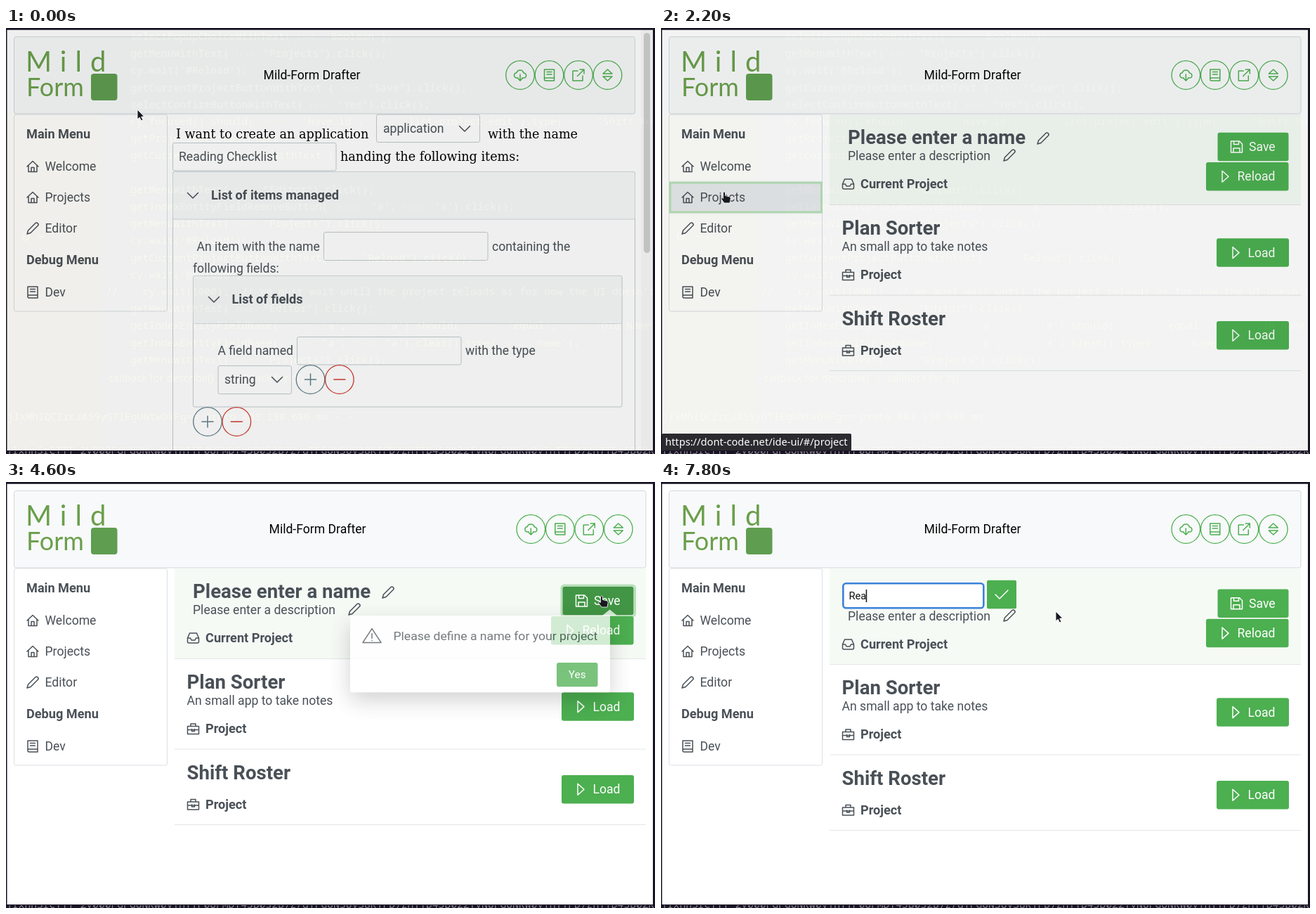
Animation of 924 by 606 pixels, one loop 8 s. Source, as an HTML page:

```html
<!DOCTYPE html>
<html lang="en">
<head>
<meta charset="utf-8">
<title>Mild-Form Drafter</title>
<style>
html, body { margin: 0; width: 100%; height: 100%; overflow: hidden; background: #fff; }
svg { display: block; width: 100vw; height: 100vh; }
text { font: 17.6px Roboto, sans-serif; fill: #495057; white-space: pre; }
.bold { font-weight: 700; font-size: 18.15px; }
.big { font-weight: 700; font-size: 27.6px; }
.serif { font-family: "DejaVu Serif", serif; fill: #000; }
.title { fill: #000; text-anchor: middle; }
.white { fill: #fff; }
.small { font-size: 15.4px; text-anchor: middle; }
.entry { font-size: 14.67px; fill: #111; }
.mono { font: 14.67px "Noto Sans Mono", monospace; }
.url { font: 14.67px "Noto Sans", sans-serif; fill: #fff; }
.logo { font-family: Lato, sans-serif; fill: #6a9f4b; }
.ghost text { fill: #fbf9f1; fill-opacity: .75; }
.hint { font-size: 11px; fill-opacity: .4; }
.icon { fill: none; stroke: #495057; stroke-width: 1.5; stroke-linejoin: round; stroke-linecap: round; }
.icon.pale { stroke: #fff; }
.field { fill: none; stroke: #c4cad0; }
.panel { fill: #f8f9fa; stroke: #d3d8dd; }
.rule { stroke: #e3e6e9; }
.button { fill: #4caf50; }
#page { mix-blend-mode: multiply; }
#popup { transform-origin: 490px 190px; }
#popupBox { filter: drop-shadow(0 12px 16px rgba(0, 0, 0, .24)); }
</style>
</head>
<body>
<svg id="stage" viewBox="0 0 924 606" preserveAspectRatio="none"></svg>
<script>
const ICONS = {
  home: 'M-8 0L0 -7.5L8 0M-6 -1.8V7.5H6V-1.8M-2 7.5V1.5H2V7.5',
  pencil: 'M-8 8L-6.5 3L4 -7.5Q5.5 -8.8 7.2 -7.2Q8.8 -5.5 7.5 -4L-3 6.5Z',
  book: 'M-7 -8H7V8H-5Q-7 8 -7 6ZM-7 5Q-7 4 -5 4H7M-3.5 -4.5H3.5M-3.5 -1H3.5',
  inbox: 'M-8 0L-5 -7H5L8 0V5Q8 7 6 7H-6Q-8 7 -8 5ZH-4L-2.5 3H2.5L4 0H8',
  briefcase: 'M-8 -4H8V7H-8ZM-3.5 -4V-7.5H3.5V-4M-8 1H8M-2 0V3H2V0',
  save: 'M-8 -8H4L8 -4V8H-8ZM-4 -8V-3.5H3V-8M-4.5 8V2H4.5V8',
  play: 'M-4 -8L5 0L-4 8Z',
  cloud: 'M-3 4H-5Q-8.5 3.5 -8.5 0Q-8 -3 -5 -3.4Q-4 -7 0 -7Q4 -7 5 -3Q8.6 -2.5 8.6 .7Q8.5 4 5 4H3M0 -1V8M-3 5L0 8L3 5',
  link: 'M-1 -6H-8V8H6V1M2 -8H8V-2M8 -8L-1.5 1.5',
  sort: 'M-6.5 -2L0 -8L6.5 -2ZM-6.5 2L0 8L6.5 2Z',
  chevron: 'M-7.5 -3.5L0 4L7.5 -3.5',
  check: 'M-9 0L-3 6L9 -6',
  plus: 'M-8 0H8M0 -8V8',
  minus: 'M-8 0H8',
  warning: 'M0 -10.5L13 10.5H-13ZM0 -3V4M0 7V7.4'
};

const text = (x, y, s, cls = '', style = '') =>
  `<text x="${x}" y="${y}" class="${cls}" style="${style}">${s}</text>`;
const icon = (name, x, y, cls = '', extra = '') =>
  `<path class="icon ${cls}" d="${ICONS[name]}" transform="translate(${x} ${y})" ${extra}/>`;
const rect = (x, y, w, h, attrs) => `<rect x="${x}" y="${y}" width="${w}" height="${h}" ${attrs}/>`;
const box = (x, y, w, h, cls) => rect(x, y, w, h, `class="${cls}" rx="2.5"`);
const line = (x1, y1, x2, y2) => `<path class="rule" d="M${x1} ${y1}L${x2} ${y2}"/>`;
const group = (id, body, attrs = '') => `<g id="${id}" ${attrs}>${body}</g>`;
const ring = (x, y, name, color) =>
  `<circle cx="${x}" cy="${y}" r="20.3" fill="none" stroke="${color}" stroke-width="1.3"/>` +
  icon(name, x, y, '', `style="stroke:${color}"`);
const button = (x, y, w, name, label, id = '') =>
  rect(x, y, w, 40.5, `class="button" rx="3" id="${id}"`) +
  icon(name, x + 27, y + 20.3, 'pale') + text(x + 44.5, y + 26.2, label, 'white');

const header = () =>
  rect(11.5, 12.5, 884, 109.5, 'id="headerBox" class="panel" rx="3"') +
  text(28, 62, 'Mild', 'logo', 'font-size:40px;letter-spacing:12px') +
  text(29, 97, 'Form', 'logo', 'font-size:36px') +
  rect(121, 65, 37.5, 38, 'fill="#5f9d50" rx="4"') +
  group('headerTitle', text(435.5, 73, 'Mild-Form Drafter', 'title')) +
  group('headerIcons', ['cloud', 'book', 'link', 'sort']
    .map((name, i) => ring(732 + i * 41.5, 67, name, '#4caf50')).join(''));

const menu = () =>
  rect(11.5, 123, 218, 280, 'rx="3" fill="#fff" stroke="#dbdfe4"') +
  rect(12, 0, 217.5, 44, 'id="menuHover" fill="#e6e9ed"') +
  rect(13, 220, 215.5, 42, 'id="menuFocus" fill="none" stroke="#b7dfb9" stroke-width="3"') +
  text(29, 157, 'Main Menu', 'bold') + text(29, 336, 'Debug Menu', 'bold') +
  [['home', 'Welcome', 197], ['home', 'Projects', 241], ['pencil', 'Editor', 285], ['book', 'Dev', 376]]
    .map(([name, label, y]) => icon(name, 38, y) + text(55.5, y + 6, label)).join('');

const editor = () =>
  text(242, 157, 'I want to create an application', 'serif') +
  box(527.5, 123, 147, 39.5, 'field') + text(537, 148.5, 'application') + icon('chevron', 653, 143) +
  text(686, 157, 'with the name', 'serif') +
  box(237.5, 163.5, 232.5, 39.5, 'field') + text(246, 189, 'Reading Checklist') +
  text(476, 189, 'handing the following items:', 'serif') +
  box(237.5, 204.5, 658, 420, 'field') + box(237.5, 204.5, 658, 67.5, 'panel') +
  icon('chevron', 266, 238) + text(292, 244, 'List of items managed', 'bold') +
  text(271.5, 317, 'An item with the name') + box(452.5, 290.5, 233.5, 40, 'field') +
  text(692, 317, 'containing the') + text(266, 347.5, 'following fields:') +
  box(266.5, 352.5, 610.5, 186.5, 'field') + box(266.5, 352.5, 610.5, 68, 'panel') +
  icon('chevron', 296, 386) + text(321.5, 392, 'List of fields', 'bold') +
  text(301.5, 465, 'A field named') + box(414.5, 439.5, 233.5, 39.5, 'field') + text(654, 465, 'with the type') +
  box(302, 480.5, 104.5, 40, 'field') + text(311, 506, 'string') + icon('chevron', 386, 500) +
  [[433.5, 500], [287, 560]].map(([x, y]) =>
    ring(x, y, 'plus', '#607d8b') + ring(x + 41.3, y, 'minus', '#d3382f')).join('') +
  rect(904, 3, 17, 598, 'fill="#f9f9f9"') + rect(908, 7, 9, 313, 'rx="4.5" fill="#cfd0d1"');

const project = (y, name, note) => {
  const low = note ? 0 : -21.5;
  return text(257.5, y, name, 'big') + (note ? text(257.5, y + 23, note) : '') +
    icon('briefcase', 266.5, y + 57.5 + low) + text(284, y + 63 + low, 'Project', 'bold');
};

const projects = () =>
  rect(240, 123, 671, 128, 'id="card" fill="#f5faf5"') +
  group('nameView', text(266, 165, 'Please enter a name', 'big') + icon('pencil', 544, 157)) +
  group('nameEdit',
    rect(259.3, 144.3, 200, 35, 'rx="4" fill="#fff" stroke="#3a82da" stroke-width="2.6"') +
    '<text id="entry" class="entry" x="267.5" y="167"></text>' +
    rect(268, 153, 1.5, 18, 'id="caret" fill="#111"') +
    rect(464, 139.7, 42, 40.5, 'class="button" rx="2"') + icon('check', 485, 160, 'pale')) +
  group('about', text(266, 188, 'Please enter a description') + icon('pencil', 496, 181) +
    icon('inbox', 266.5, 222) + text(284, 228, 'Current Project', 'bold')) +
  group('actions',
    rect(791, 147, 104.5, 44, 'id="saveFocus" rx="4" fill="none" stroke="#b7dfb9" stroke-width="3"') +
    button(792.5, 148.7, 101, 'save', 'Save', 'save') + button(776, 191, 117.5, 'play', 'Reload')) +
  group('others', line(240, 251.5, 911, 251.5) + line(240, 380, 911, 380) + line(240, 487.5, 911, 487.5) +
    project(294, 'Plan Sorter', 'An small app to take notes') + project(423, 'Shift Roster') +
    button(791, 299.3, 103, 'play', 'Load') + button(791, 417, 103, 'play', 'Load'));

const popup = () =>
  '<path id="popupBox" fill="#fff" d="M493 190H849L859.5 181L870 190H860V302Q860 305 857 305H493Q490 305 490 302V193Q490 190 493 190Z"/>' +
  icon('warning', 521, 220, '', 'stroke-width="2"') +
  text(551.5, 227, 'Please define a name for your project') +
  rect(782.5, 259, 61, 39, 'id="yesFocus" rx="4" fill="none" stroke="#b7dfb9" stroke-width="3"') +
  rect(784, 260.5, 58.5, 36, 'id="yes" class="button" rx="3"') + text(813.2, 283.8, 'Yes', 'white small');

const CODE = [
  "selectPopupChoiceWithText( text: 'Boolean');", 'getMenuWithText( text: "Projects").click();',
  "cy.wait('@Reload');", 'getCurrentProjectButtonWithText ( text: "Save").click();',
  'selectConfirmButtonWithText( text: "Yes").click();',
  "cy.focused().should( chainer: 'have.id', value: 'list-project-edit').type( text: \"Shift Roster\");",
  'getProjectButtonWithText', 'getCurrentProjectButtonWithText (', '',
  'getMenuWithText( text: "Editor").click();', "getIndexEntityFieldRemoveButton( entity: 'a', field: 'a').click();",
  'getMenuWithText( text: "Projects").click();', "cy.wait('@Reload');",
  'getCurrentProjectButtonWithText( text: "Reload").click();', "cy.wait('@Reload');",
  "  cy.wait(1000);  // We must wait until the project reloads as for now the UI doesn't",
  'getMenuWithText( text: "Editor").click();', "getIndexEntityFieldName( entity: 'a', field: 'a').should( chainer: 'equal', value: 'Old Name');",
  "getIndexEntityFieldName( entity: 'a', field: 'a').clear().type( text: 'name');", 'getMenuWithText( text: "Projects").click();'
];
const withHints = s => s.replace(/\w+: (?=['"])/g, '<tspan class="hint">$&</tspan>');
const TOKEN = 'jIxhnSrCTTT_2V000FGFGUNKw0VTHTTF0UFMDT45B0S2B7Z/dTFGUNSUV38KTFD7ZHTTD45B022TVNUFGUNKW0VTHTTFD7ZHTTD45B02KTZV0';

// The terminal and code window shining through the page
const ghost = () =>
  rect(0, 0, 924, 606, 'fill="#eeefee"') + rect(1, 122, 133, 480, 'fill="#f0efeb"') +
  CODE.map((s, i) => text(177, 17 + i * 24.2, withHints(s), 'mono')).join('') +
  text(142, 380, '//', 'mono') + text(20, 303, '⚙  –') +
  text(146, 503, 'callback for describe()   ›   callback for it()', 'url') +
  text(2, 558, 'jIxMhIQCZrcJA59yGTlEgUNtwD8Fg== proto 403 130.686 ms - -', 'mono') +
  text(0, 606, TOKEN, 'mono');

const frame = () =>
  '<path fill="#191424" d="M0 0H924V606H0ZM1.5 2.8V601H921V2.8Z" fill-rule="evenodd"/>' +
  '<clipPath id="strip"><path d="M0 602H924V606H0Z"/></clipPath>' +
  `<g clip-path="url(#strip)">${text(0, 606, TOKEN, 'mono', 'fill:#85818c')}</g>`;

const pointer = () =>
  '<path id="arrow" fill="#17191f" stroke="#fff" stroke-width=".9" d="M0 0V14L3.2 11.2L5.6 16L8 14.8L5.7 10.3L9.6 9.8Z"/>' +
  '<path id="hand" fill="#17191f" stroke="#fff" stroke-width=".8" d="M-1.5 1Q0 -1 1.5 1V5.5L7.5 7Q9.5 7.6 9.2 9.5L8 16H0L-4 10.5Q-4.8 8.4 -2.8 8.6L-1.5 9.5Z"/>';

const statusBar = () =>
  rect(1, 577, 262, 24.5, 'id="statusBox" rx="2" fill="#2b2b2f"') +
  '<text id="statusText" class="url" x="6" y="594"></text>';

document.getElementById('stage').innerHTML =
  rect(0, 0, 924, 606, 'fill="#fff"') + group('ghost', ghost(), 'class="ghost"') +
  group('page', header() + menu() + group('editor', editor()) + group('projects', projects())) +
  group('popup', popup()) + group('status', statusBar()) + frame() + group('pointer', pointer());

// time, x, y of the pointer tip
const PATH = [
  [600, 187, 116], [900, 160, 165], [1200, 124, 250], [1500, 106, 276], [1600, 106, 263],
  [1700, 100, 250], [1900, 90, 233], [3500, 90, 233], [3600, 690, 184], [3900, 770, 173],
  [4100, 838, 166], [4300, 848, 162], [4800, 848, 162], [5100, 842, 205], [5500, 813, 278],
  [5900, 813, 278], [6000, 732, 233], [6200, 732, 233], [6300, 562, 184], [8000, 562, 184]
];

function pointerAt(t) {
  const i = PATH.findIndex(p => p[0] > t);
  if (i < 1) return PATH[i < 0 ? PATH.length - 1 : 0].slice(1);
  const [a, b] = [PATH[i - 1], PATH[i]];
  const k = (t - a[0]) / (b[0] - a[0]);
  return [a[1] + (b[1] - a[1]) * k, a[2] + (b[2] - a[2]) * k];
}

const el = id => document.getElementById(id);
const attr = (id, name, value) => el(id).setAttribute(name, value);
const show = (id, on) => { el(id).style.display = on ? '' : 'none'; };
const fade = (id, value) => { el(id).style.opacity = value; };
const move = (id, x, y) => attr(id, 'transform', `translate(${x} ${y})`);
const tint = (id, on) => { el(id).style.fill = on ? '#419544' : ''; };

function draw(time) {
  const t = Math.floor(time / 100) * 100;
  const between = (a, b) => t >= a && t < b;
  const listed = t >= 2200, editing = t >= 6000;

  show('editor', !listed);
  show('projects', listed);
  attr('headerBox', 'width', listed ? 899.5 : 884);
  move('headerTitle', listed ? 8 : 0, 0);
  move('headerIcons', listed ? 15.3 : 0, 0);
  fade('ghost', t < 2200 ? 1 : t < 2300 ? .75 : t < 2400 ? .5 : t < 3600 ? .3 : 0);

  const [x, y] = pointerAt(t);
  const row = Math.floor((y - 175) / 44);
  const inMenu = t < 3600 && x < 230 && row >= 0 && row < 3;
  const onSave = between(4100, 5000), onYes = between(5500, 6000);
  const hand = inMenu || onSave || onYes;
  move('pointer', x, y);
  show('hand', hand);
  show('arrow', !hand);

  show('menuHover', inMenu);
  attr('menuHover', 'y', 175 + row * 44);
  show('menuFocus', between(1900, 4400));
  show('status', between(1300, 3600));
  fade('status', t < 2400 ? 1 : .5);
  attr('statusBox', 'width', t < 1700 ? 262 : 270);
  el('statusText').textContent = 'https://dont-code.net/ide-ui/#/' + (t < 1700 ? 'editor' : 'project');

  tint('save', onSave);
  show('saveFocus', between(4400, 5700));
  show('popup', between(4500, 6000));
  fade('popup', t < 4600 ? .25 : t < 4700 ? .75 : 1);
  el('popup').style.transform = `scaleY(${t < 4600 ? .85 : t < 4700 ? .95 : 1})`;
  tint('yes', t >= 5700);
  show('yesFocus', t >= 5700);

  show('nameView', !editing);
  show('nameEdit', editing);
  attr('card', 'height', editing ? 137 : 128);
  move('about', 0, editing ? 9 : 0);
  move('actions', 0, editing ? 3.8 : 0);
  move('others', 0, editing ? 8 : 0);
  const typed = t < 7400 ? 0 : Math.min(3, 1 + Math.floor((t - 7400) / 200));
  el('entry').textContent = 'Rea'.slice(0, typed);
  attr('caret', 'x', 268 + typed * 7.9);
  show('caret', !between(6800, 7400));
}

function tick(now) {
  draw(now % 8000);
  requestAnimationFrame(tick);
}
draw(0);
requestAnimationFrame(tick);
</script>
</body>
</html>
```
